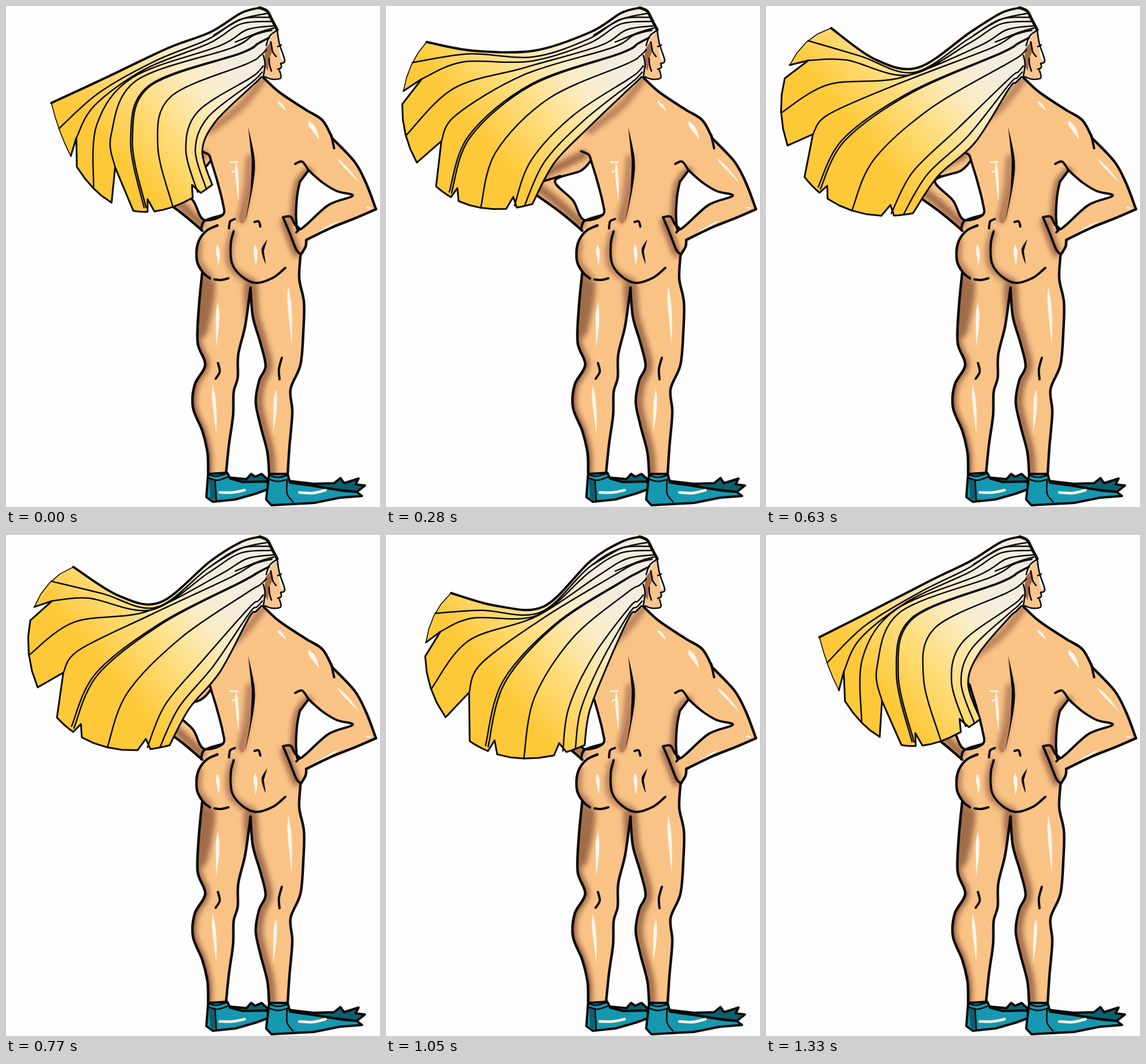
Write an HTML page that moves like this. It is 644x863 px and loops after 1.4 s.

```html
<!DOCTYPE html>
<html lang="en">
<head>
<meta charset="utf-8">
<title>Hair in the wind</title>
<style>
  html, body { margin: 0; width: 100%; height: 100%; overflow: hidden; background: #fefefe; }
  svg { display: block; width: 100vw; height: 100vh; }
  path { stroke-linecap: round; stroke-linejoin: round; }
</style>
</head>
<body>
<svg viewBox="0 0 644 863">
  <defs>
    <linearGradient id="gold" gradientUnits="userSpaceOnUse" x1="155" y1="216" x2="350" y2="52">
      <stop offset="0" stop-color="#fec938"/>
      <stop offset=".4" stop-color="#ffde80"/>
      <stop offset=".72" stop-color="#faecc4"/>
      <stop offset="1" stop-color="#f3ede1"/>
    </linearGradient>
    <filter id="soft" x="-60%" y="-60%" width="220%" height="220%" filterUnits="userSpaceOnUse"><feGaussianBlur stdDeviation="5"/></filter>
    <clipPath id="inside"><path id="mask"/></clipPath>
  </defs>
  <g id="skin"></g>
  <g clip-path="url(#inside)"><g id="shade" filter="url(#soft)"></g><g id="shine"></g></g>
  <g id="lines"></g>
  <g id="hair"></g>
</svg>
<script>
const INK = '#0b0908', PAPER = '#fefefe', SKIN = '#fac386', BROWN = '#a06c49';
const $ = id => document.getElementById(id);
const points = s => s.trim().split(/\s+/).map(p => p.split(',').map(Number));
const round = p => p.map(n => Math.round(n * 10) / 10);

// Smooth curve through all points.
function curve(p, start = 'M') {
  let d = start + round(p[0]);
  for (let i = 0; i < p.length - 1; i++) {
    const a = p[i - 1] || p[i], b = p[i], c = p[i + 1], e = p[i + 2] || c;
    const h1 = b.map((v, k) => v + (c[k] - a[k]) / 6);
    const h2 = c.map((v, k) => v - (e[k] - b[k]) / 6);
    d += `C${round(h1)} ${round(h2)} ${round(c)}`;
  }
  return d;
}
const poly = (p, start = 'M') => start + p.map(round).join('L');

function add(group, d, attrs) {
  const el = document.createElementNS('http://www.w3.org/2000/svg', 'path');
  el.setAttribute('d', d);
  for (const k in attrs) el.setAttribute(k, attrs[k]);
  $(group).append(el);
  return el;
}
const pen = (width, color = INK) => ({ fill: 'none', stroke: color, 'stroke-width': width });
const rim = { stroke: INK, 'stroke-width': 4 };
const fill = (group, color, s, extra) => add(group, curve(points(s)) + 'Z', { fill: color, ...extra });
const flat = (group, color, s, extra) => add(group, poly(points(s)) + 'Z', { fill: color, ...extra });
const stroke = (group, width, color, ...list) =>
  list.forEach(s => add(group, curve(points(s)), pen(width, color)));

// Contours of the body, used for both the skin and its outline
const shape = {
  shoulder: '443,123 470,148 515,178 545,197 562,228',
  arm: '562,228 600,268 620,305 637,350',
  forearm: '637,350 600,366 560,382 517,403',
  hand: '517,403 516,414 508,428',
  outerRight: '507,430 505,470 513,510 512,560 507,618 490,660 493,700 488,760 485,806',
  innerRight: '453,806 450,768 438,722 430,682 436,645 447,620 438,580 425,535 421,485',
  innerLeft: '421,485 412,550 400,600 399,640 392,665 391,705 384,755 379,804',
  outerLeft: '348,804 347,770 338,732 322,692 325,652 343,618 330,580 332,520 338,458',
  cheek: '351,469 340,460 329,440 330,410 344,388 364,378',
  farArm: '338,387 300,355 248,318'
};
const hidden = '246,302 300,236 345,200 400,150';
const outline = Object.values(shape).map(points);
const skin = outline.map((p, i) => curve(p, i ? 'L' : 'M')).join('') + poly(points(hidden), 'L') + 'Z';
add('skin', skin, { fill: SKIN });
$('mask').setAttribute('d', skin);

// Shading
stroke('shade', 22, BROWN, '350,480 346,515 336,560');
stroke('shade', 15, BROWN, shape.outerLeft, '248,300 300,276 340,256', '262,312 300,342 336,376',
  '521,285 503,310 497,368', '480,372 500,425');
stroke('shade', 13, '#b9805a', '420,262 414,320 404,368', '443,125 405,172 350,215',
  '332,405 331,440 350,466', '390,392 384,425 392,455 425,476');
stroke('shade', 24, BROWN, shape.innerRight);
stroke('shine', 12, '#ac7652', shape.innerRight);
stroke('shine', 9, '#a06c4c', '348,804 347,770 338,732 322,692 325,652 343,618');
fill('shine', '#b9805a', '423,285 421,330 410,372 402,366 412,330');

// Highlights: slim drops from top to bottom
function glint(x, y, length, lean = 0, width = 6) {
  const tip = [x + lean, y + length], mid = k => [x + lean * k, y + length * k];
  const [a, b] = [mid(.25), mid(.6)];
  const d = curve([[x, y], [a[0] + width / 2, a[1]], [b[0] + width / 2, b[1]], tip]) +
    curve([tip, [b[0] - width / 3, b[1]], [a[0] - width / 2, a[1]], [x, y]], 'L') + 'Z';
  add('shine', d, { fill: '#fff5e8' });
}
[[468, 163, 18, 14], [521, 197, 33, 18, 9], [570, 262, 42, 38], [573, 370, 22, -40], [365, 510, 78, -3],
  [486, 482, 102, 6], [356, 652, 85, 6], [465, 660, 76, -5], [364, 411, 36, 2], [429, 410, 38, 1],
  [396, 268, 70, 4, 5]].forEach(g => glint(...g));
stroke('shine', 3, '#fff5e8', '387,269 399,269', '390,286 398,282', '622,347 626,348');

// Gaps between arms and torso
fill('lines', PAPER, '353,266 335,284 291,301 322,335 340,368 373,360 373,338 362,295', rim);
fill('lines', PAPER, '521,283 545,304 570,319 597,327 555,343 508,384 500,372 501,330 506,303', rim);

// Head
flat('lines', '#f9c48d', '455,55 468,42 472,66 480,94 472,99 474,108 470,112 473,124 458,126 443,121 443,90');
flat('lines', '#fff', '469,46 473,66 480,93 474,93 469,70');
flat('lines', BROWN, '446,74 457,60 460,74 453,92 451,112 445,104');
stroke('lines', 2.6, INK, '467,42 471,66 480,94 473,99', '473,99 474,106 468,109', '471,111 473,124 458,126 446,122',
  '456,62 459,78 465,87', '453,90 454,102 457,112', '468,70 474,67');

// Body outline and ink details
outline.forEach(p => add('lines', curve(p), pen(4.4)));
stroke('lines', 4, INK, '560,222 565,245', '498,272 510,268 521,283', '477,364 490,363 498,377 505,383 500,390',
  '477,364 488,390 500,420 508,428', '246,302 265,303 300,293', '336,250 349,256 353,266', '373,360 342,370 336,386',
  '359,471 370,472 383,469', '392,388 387,410 389,443 405,465 430,477 460,468 481,451', '384,383 386,371 394,367',
  '428,372 435,371 438,380', '365,615 368,630 361,642', '475,606 470,625 471,643');
fill('lines', INK, '417,208 428,262 426,305 412,373 421,318 423,265');
fill('lines', INK, '450,402 440,420 447,444 444,422');
fill('lines', INK, '420,490 426,535 436,575 427,548');

// Fins
const TEAL = '#1598b0', DEEP = '#0c6070';
flat('lines', DEEP, '382,812 414,815 422,806 429,811 440,806 450,815 451,827 400,824', rim);
flat('lines', TEAL, '348,806 381,804 386,814 408,820 450,819 452,832 430,840 395,850 356,854 345,846', rim);
flat('lines', DEEP, '487,818 530,823 565,822 576,813 582,822 607,814 602,824 618,826 604,837 560,832', rim);
flat('lines', TEAL, '453,806 485,806 489,821 525,826 580,835 604,837 613,844 575,847 530,856 457,860 448,850', rim);
flat('lines', DEEP, '349,812 361,815 363,850 352,851');
stroke('lines', 2.6, INK, '348,807 362,810 381,805', '349,813 364,817 383,811', '360,817 362,852',
  '453,808 468,812 485,808', '453,815 468,819 487,815', '484,818 484,840 494,854');
stroke('lines', 4.5, '#fff7e5', '368,838 390,838 411,834', '505,838 528,839 550,834');

/* Hair: four guide locks, from the top of the fan to its right side, shape the whole mane.
   Each guide runs from its loose end over two bends; the roots on the head stay put. */
const guides = s => s.split('/').map(points);
const roots = guides('352,45 405,12 447,8 / 360,68 410,38 460,32 / 400,78 432,60 455,50 / 418,143 430,132 440,122');
const low = guides('78,167 175,122 280,72 / 135,296 152,195 222,120 / 228,354 205,230 238,135 / 355,308 338,250 360,200');
const rise = guides('70,62 150,77 255,77 / 29,195 120,125 240,103 / 95,318 135,215 245,130 / 252,341 290,270 350,208');
const high = guides('80,28 145,62 250,80 / 14,155 110,106 235,95 / 65,292 112,205 225,125 / 233,340 275,290 340,225');
const sink = guides('112,38 188,92 262,106 / 27,152 115,118 235,122 / 75,305 125,218 245,142 / 253,357 297,292 360,235');
const fall = guides('112,100 190,122 272,123 / 70,236 140,168 258,140 / 155,362 190,245 285,150 / 342,362 350,305 378,232');
const rest = low.map(g => g.map(([x, y], i) => [x + 14 - 4 * i, y + 9 - 2 * i]));

const LOOP = 1400, STEP = 70;
const keys = [[0, low], [280, rise], [420, high], [630, sink], [1050, fall], [1330, rest]];
const key = i => {
  const n = keys.length, turn = Math.floor(i / n), [t, pose] = keys[i - turn * n];
  return { t: t + turn * LOOP, pose };
};

// Cyclic Hermite blend between the key poses.
function poseAt(t) {
  let i = keys.length - 1;
  while (keys[i][0] > t) i--;
  const [a, b, c, d] = [-1, 0, 1, 2].map(k => key(i + k));
  const span = c.t - b.t, u = (t - b.t) / span, v = 1 - u;
  return b.pose.map((g, gi) => g.map((p, pi) => p.map((_, k) => {
    const [w, x, y, z] = [a, b, c, d].map(q => q.pose[gi][pi][k]);
    const m0 = (y - w) / (c.t - a.t) * span, m1 = (z - x) / (d.t - b.t) * span;
    return x * (1 + 2 * u) * v * v + m0 * u * v * v + y * u * u * (3 - 2 * u) - m1 * u * u * v;
  })));
}

// Lock at position u (0 to 3) across the fan: cubic interpolation of the guides.
function lockAt(pose, u) {
  const w = [0, 1, 2, 3].map(i => [0, 1, 2, 3].reduce((p, j) => j === i ? p : p * (u - j) / (i - j), 1));
  return pose[0].map((_, n) => [0, 1].map(k => w.reduce((sum, f, i) => sum + f * pose[i][n][k], 0)));
}
const mix = (a, b, k) => a.map((v, i) => v + (b[i] - v) * k);
const inward = (lock, k) => [mix(lock[0], lock[1], k), ...lock.slice(1)];

// Notches in the loose edge: start, apex, end, depth
const notches = [[.66, .6, .82, .3], [1.55, 1.7, 1.92, .55], [2.14, 2.18, 2.24, .18], [2.76, 2.79, 2.86, .24]];
const rimSteps = [];
let from = 0;
for (const [a, apex, b, depth] of [...notches, [3, 3, 3, 0]]) {
  for (let i = 0; i <= 4; i++) rimSteps.push([from + (a - from) * i / 4, 0]);
  rimSteps.push([apex, depth]);
  from = b;
}
const strands = [[.3, 0], [.6, .3], [1.2, 0], [1.7, .55], [2.1, .06], [2.13, .06], [2.5, 0], [2.83, .05], [2.93, 0]];

const mane = add('hair', '', { fill: 'url(#gold)' });
const topLine = add('hair', '', pen(4));
const sideLine = add('hair', '', pen(1.6));
const endLine = add('hair', '', pen(3));
const lockLines = add('hair', '', pen(2.5));
stroke('hair', 2.6, INK, '358,50 405,23 449,13', '395,62 437,45 461,38', '448,68 454,52 468,41', '443,122 446,100 443,85');
stroke('hair', 5, INK, '437,3 450,9 457,22 467,41');
const hairline = points('437,3 450,9 458,22 468,41 460,50 448,68 443,85 446,98 440,122');

function draw(t) {
  const pose = poseAt(t).map((g, i) => [...g, ...roots[i]]);
  const edge = rimSteps.map(([u, k]) => inward(lockAt(pose, u), k)[0]);
  const top = [...pose[0].slice(0, 5), [437, 3]], side = pose[3];
  mane.setAttribute('d', curve(top) + poly(hairline, 'L') + curve([...side].reverse(), 'L') +
    poly([...edge].reverse(), 'L') + 'Z');
  topLine.setAttribute('d', curve(top));
  sideLine.setAttribute('d', poly(edge.slice(0, 5)));
  endLine.setAttribute('d', poly(edge.slice(4)) + curve(side));
  lockLines.setAttribute('d', strands.map(([u, k]) => curve(inward(lockAt(pose, u), k))).join(''));
}

let shown = -1;
function tick() {
  const t = Math.floor(performance.now() % LOOP / STEP) * STEP;
  if (t !== shown) draw(shown = t);
  requestAnimationFrame(tick);
}
tick();
</script>
</body>
</html>
```
